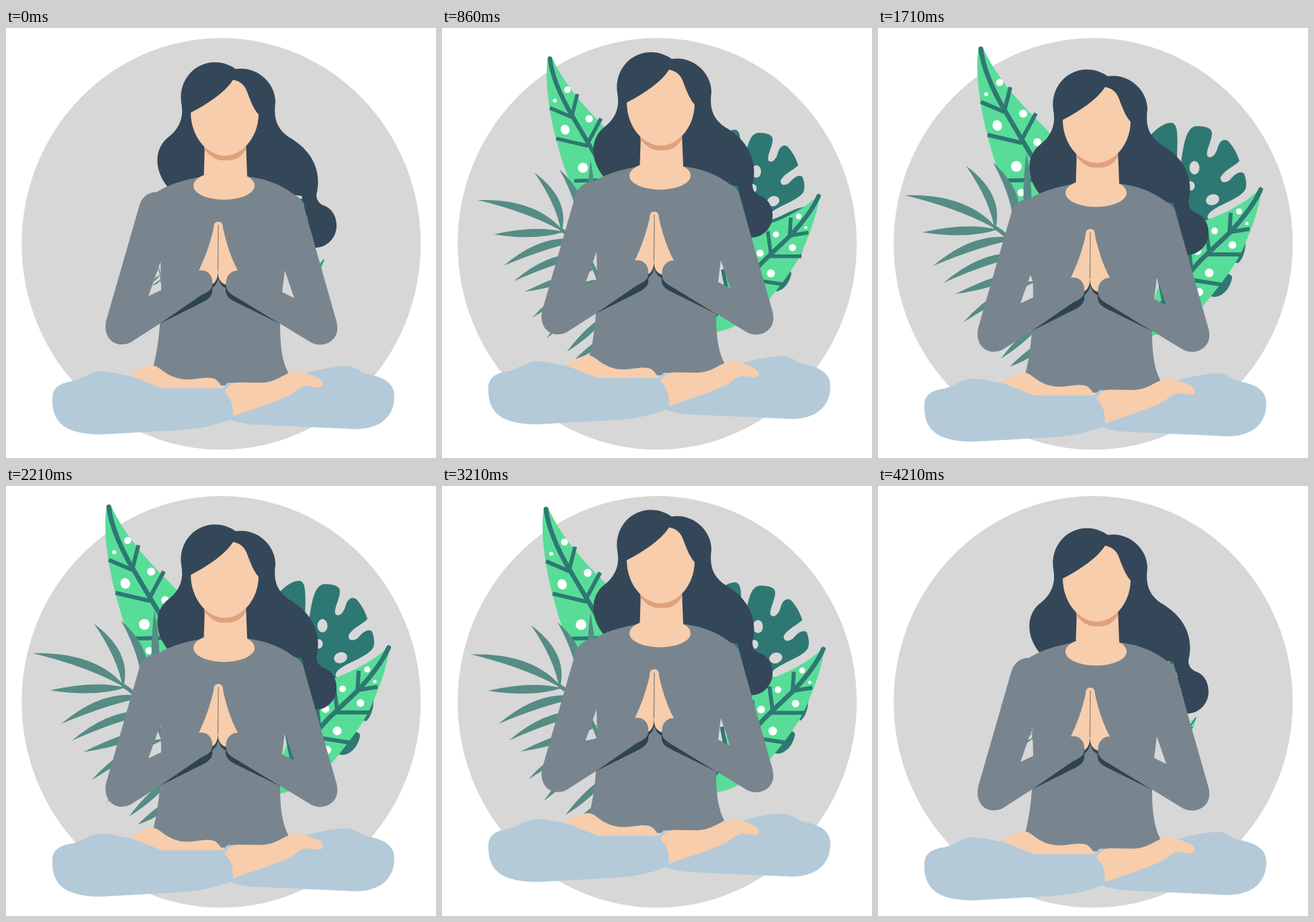
Write an HTML page that moves like this. It is 640 by 640 pixels and loops after 4280 ms.

```html
<!DOCTYPE html>
<html lang="en">
<head>
<meta charset="utf-8">
<title>Meditation</title>
<style>
  html, body { margin: 0; width: 100%; height: 100%; overflow: hidden; background: #fff; }
  svg { display: block; width: 100vw; height: 100vh; }
  .vein { fill: none; stroke: #2e7873; stroke-width: 6; }
  .rib { stroke-width: 7; }
  .dots { fill: #fff; }
  .leaf { fill: #58dd98; }
  .dark { fill: #2e7873; }
  .ground { fill: #d7d7d7; }
  .hair { fill: #344759; }
  .skin { fill: #f7cdab; }
  .shirt { fill: #79858e; }
  .shade { fill: #2e4550; }
  .jeans { fill: #b4cad9; }
  #monstera { transform-origin: 428px 286px; }
  #right { transform-origin: 444px 376px; }
  #left { transform-origin: 259px 234px; }
  #palm { transform-origin: 224px 348px; fill: #568c86; }
</style>
</head>
<body>
<svg viewBox="0 0 640 640">
  <ellipse class="ground" cx="320.3" cy="321.3" rx="297" ry="306.3"/>

  <g id="monstera" class="plant">
    <path class="dark" d="M425 290L405 160C415 150 425 141 437 141C447 143 446 160 445 195L451 200C455 175 458 146 475 146C490 146 498 150 497 158C496 170 488 182 490 190C494 196 502 190 505 180C508 168 514 164 521 168C530 178 535 188 538 198C530 206 515 212 510 222C509 230 516 232 524 226C532 216 540 212 545 217C549 228 549 238 545 243C535 255 510 262 497 272C490 277 488 284 494 285C515 280 530 266 553 264C557 280 550 288 545 300C550 325 545 342 536 350L515 345L510 368C520 364 527 366 527 372C524 388 512 402 498 400L470 390L430 330Z"/>
    <g class="ground">
      <ellipse cx="471" cy="208" rx="7.5" ry="10"/>
      <ellipse cx="465" cy="235" rx="6.5" ry="7"/>
      <ellipse cx="498" cy="255.500" rx="10" ry="8" transform="rotate(-20 498 255.500)"/>
    </g>
  </g>

  <g id="right" class="plant">
    <path class="leaf" d="M569 239C552 256 526 272 491 285C462 299 442 330 430 360C415 385 405 420 396 460C430 456 458 440 481 417C512 380 535 350 546 322C557 296 567 270 571 240Z"/>
    <path class="vein rib" stroke-linecap="round" d="M569.500 240.500C560 262 541 286 523 305L480 346L396 440"/>
    <path class="vein" d="M523 306L525 275M522 304L553 299M489 337H542M493 334L488 297M466 358L462 318M455 373L512 382M425 405L416 358M424 408L470 425"/>
    <g class="dots">
      <circle cx="537.500" cy="273" r="4.500"/><circle cx="549" cy="291" r="2.500"/>
      <circle cx="501" cy="302" r="5"/><circle cx="527.500" cy="323" r="5.700"/>
      <circle cx="475.500" cy="332" r="5.800"/><circle cx="493" cy="364.500" r="6.500"/>
      <circle cx="478" cy="393" r="6"/><circle cx="436" cy="386" r="5"/>
    </g>
  </g>

  <g id="left" class="plant">
    <path class="leaf" d="M150 29C144 62 151 116 163 160C171 192 180 222 200 258L259 270L285 200C268 168 254 154 236 136C200 100 174 68 156 29Z"/>
    <path class="vein rib" stroke-linecap="round" d="M153 31C157 65 174 98 190 125L232 196L259 240"/>
    <path class="vein" d="M188 124L197 88M188 125L153 110M213 168L235 127M214 171L163 159M240 226L192 227"/>
    <g class="dots">
      <circle cx="181" cy="81" r="5.300"/><circle cx="161" cy="98.500" r="3"/>
      <ellipse cx="177.500" cy="145" rx="7" ry="8" transform="rotate(-20 177.500 145)"/>
      <circle cx="216" cy="127.500" r="6"/><circle cx="206" cy="206" r="8"/>
      <circle cx="237" cy="170" r="6"/><circle cx="213" cy="245" r="5.500"/>
    </g>
  </g>

  <g id="palm" class="plant">
    <path fill="none" stroke="#568c86" stroke-width="6" d="M173 296Q215 322 235 380T250 480"/>
    <path id="fronds"/>
  </g>

  <g id="body">
    <path class="hair" d="M241 237C220 212 220 180 241 163C262 147 264 128 261 112C256 80 279 51 311 51C324 51 335 56 342 61C374 56 401 82 401 110C398 133 402 150 422 163C450 179 472 208 462 248C462 256 466 261 472 264C486 268 492 282 492 294C492 312 478 327 460 327L440 250L300 230Z"/>
    <path class="shirt" fill-rule="evenodd" d="M295 221C265 225 240 234 225 244C212 244 202 251 198 266L149 436C145 455 155 471 172 471C180 471 186 468 190 465L229 440C227 468 224 485 219 505L240 532H322L408 530L421 515C411 496 408 475 408 440L454 468C474 478 495 464 493 445C493 438 491 434 490 430L443 265C441 255 434 250 429 248C405 230 383 224 359 221ZM230 348L231 390L212 399ZM415 361L429 402L411 393Z"/>
    <path class="skin" d="M296 170L294.500 219C284 223 279 229 279 235C279 246 299 255.500 324.500 255.500S370 246 370 235C370 229 366 224 359 221L357 170Z"/>
    <path fill="#dea27c" d="M295 174V180C303 191 313 197 322 197H331C343 197 354 189 357 179V173Z"/>
    <path class="skin" d="M338 77C351 80 356 86 360 98C366 114 370 122 376 129C375 165 350 190 326 190C298 190 275 160 275 126C300 113 327 95 338 77Z"/>

    <path class="shade" d="M316 358C315 374 311 381 307 381C307 390 300 393 290 398L229 440L295 407C306 401 308 394 307 388C310 383 314 382 316 372C318 381 322 385 327 387C326 394 328 401 340 407L409 441L345 402C332 395 327 390 328 382C322 381 317 374 316 358Z"/>
    <path class="skin" d="M316 288.500C310 288 309 294 309 298C304 320 297 340 287 361C297 359 309 372 307 381C313 378 316 370 315.500 360L316 368C316 372 320 381 328 382C327 372 335 361 345 361C334 340 328 320 323 298C323 294 322 288 316 288.500Z"/>
    <path fill="none" stroke="#2e4550" stroke-width=".7" d="M316 293Q316 330 315.300 362"/>
    <path class="shirt" d="M286 362C297 357 308 367 307 379C307 388 302 392 290 397L270 390ZM346 362C337 359 327 368 327.500 380C327 389 333 395 344 400L362 390Z"/>

    <path class="jeans" d="M320 538L330 528L408 529C425 518 470 505 505 503C516 503 524 508 533 514C560 519 578 527 578 548C578 580 555 597 520 597L365 590C350 588 340 586 333 583Z"/>
    <path class="jeans" d="M69 552C69 536 78 529 98 526C115 522 125 511 143 511C160 512 170 516 182 517C200 522 215 530 233 536H322C334 545 338 560 337 581C318 590 290 597 250 599L140 605C95 604 68 592 69 552Z"/>
    <path class="skin" d="M183 517C200 506 212 501 222 503C232 507 240 520 265 523C285 524 300 517 312 523C317 527 320 531 322 536H233C215 530 200 522 183 517Z"/>
    <path class="skin" d="M325 541C330 532 336 528 345 527.500L380 528C402 527 412 516 425 512C438 510 448 514 460 519C470 523 473 528 471 533C465 537 458 533 445 533C436 535 432 541 425 545C405 556 370 566 338 578C338 560 335 550 325 541Z"/>
  </g>
</svg>
<script>
  // A tapering blade from tip (x, y) to base (u, v), bowed sideways by bend
  function frond([x, y, u, v, bend, width]) {
    const dx = u - x, dy = v - y, len = Math.hypot(dx, dy);
    const ctrl = off => `${x + dx * .6 - dy / len * off} ${y + dy * .6 + dx / len * off}`;
    return `M${x} ${y}Q${ctrl(bend - width)} ${u} ${v}Q${ctrl(bend + width)} ${x} ${y}Z`;
  }

  document.getElementById('fronds').setAttribute('d', [
    [40, 249, 180, 302, -24, 13],
    [131, 205, 174, 302, -24, 12],
    [66, 304, 178, 300, 0, 13],
    [82, 354, 208, 314, -20, 13],
    [98, 379, 222, 338, -20, 12],
    [115, 396, 232, 356, 2, 12],
    [127, 438, 238, 376, -15, 11],
    [150, 471, 243, 400, -12, 11],
    [183, 492, 248, 432, 0, 10],
    [196, 504, 252, 462, 4, 10],
    [171, 200, 202, 306, -28, 13],
    [221, 185, 224, 312, 0, 12]
  ].map(frond).join(''));

  const LOOP = 4280, STEP = 1000 / 14, PERIOD = 2400;
  const body = document.getElementById('body');
  const plants = document.querySelectorAll('.plant');

  function plantScale(t) {
    const k = Math.max(0, Math.min(t, 4214 - t));
    const phase = Math.min(Math.PI, 1 + .00176 * k + 1.26e-7 * k * k);
    return (1 - Math.cos(phase)) / 2;
  }

  function bodyShift(t) {
    return -14.3 * Math.cos((t - 665) / PERIOD * 2 * Math.PI) - 2.4;
  }

  function draw(now) {
    // The motion advances at 14 poses per second
    const pose = Math.min(59, Math.floor((now % LOOP + 6) / STEP));
    const t = pose * STEP;
    body.style.transform = `translateY(${bodyShift(t)}px)`;
    for (const plant of plants) plant.style.transform = `scale(${plantScale(t)})`;
  }

  let start;
  function tick(now) {
    start ??= now;
    draw(now - start);
    requestAnimationFrame(tick);
  }
  draw(0);
  requestAnimationFrame(tick);
</script>
</body>
</html>
```
